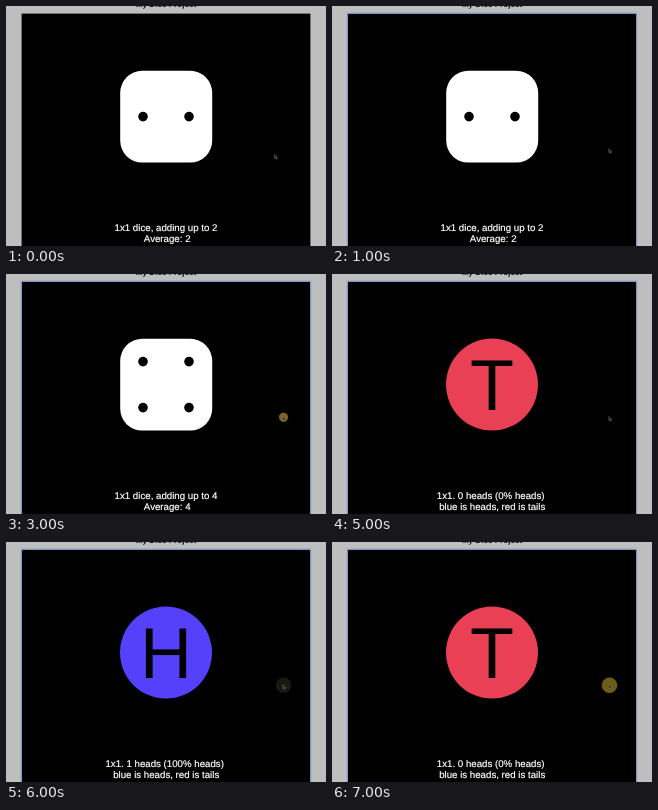
These frames come from a looping animation (320x240 px, 8000 ms). An HTML page:

```html
<!DOCTYPE html>
<html lang="en">
<head>
<meta charset="utf-8">
<title>My Dice Project</title>
<style>
  html, body { margin: 0; width: 100%; height: 100%; overflow: hidden; background: #bebebe; }
  svg { display: block; width: 320px; height: 240px; }
  text { font-family: "Liberation Sans", Arial, sans-serif; text-anchor: middle; text-rendering: geometricPrecision; }
  .line { font-size: 9.7px; fill: #fff; stroke: #fff; stroke-width: 0.2px; }
</style>
</head>
<body>
<svg viewBox="0 0 320 240">
  <rect width="320" height="240" fill="#bebebe"/>
  <text x="160" y="1.3" font-size="8.1" font-weight="bold" fill="#111">My Dice Project</text>
  <rect x="15.6" y="7.6" width="288.8" height="240"/>
  <rect id="focus" x="15.2" y="7.2" width="289.6" height="240" rx="0.6" fill="none" stroke="#8fa2d2" stroke-width="1.2"/>
  <g id="die">
    <rect x="114.2" y="64.8" width="92" height="91.8" rx="22" fill="#fff"/>
    <g id="pips"></g>
  </g>
  <g id="coin">
    <circle id="disc" cx="160" cy="110.6" r="46"/>
    <text id="face" x="160" y="135.7" font-size="72"></text>
  </g>
  <text id="top" class="line" y="224.7"></text>
  <text id="bottom" class="line" y="235.6"></text>
  <circle id="halo" cx="277.5" cy="143.2"/>
  <path id="cursor" d="M0 0V4L1 3.2L1.7 4.7L2.4 4.4L1.8 3H3Z" fill="#181818" stroke="#999" stroke-width="0.4"/>
</svg>
<script>
const $ = id => document.getElementById(id);
const STEP = 1000;

// Halo styles: radius, fill, stroke
const halos = {
  none: [0, "none", "none"],
  press: [4.2, "#7a6620", "#927a24"],
  full: [7.5, "#6c5d16", "#756518"],
  faint: [7.7, "#1a1810", "none"]
};

const steps = [
  { die: 2, halo: "none", idle: true },
  { die: 2, halo: "none" },
  { die: 5, halo: "full" },
  { die: 4, halo: "press" },
  { coin: "H", halo: "full" },
  { coin: "T", halo: "none" },
  { coin: "H", halo: "faint" },
  { coin: "T", halo: "full" }
];

// Pip places on a grid from -1 to 1
const corners = [[-1, -1], [1, -1], [-1, 1], [1, 1]];
const layouts = {
  2: [[-1, 0], [1, 0]],
  4: corners,
  5: [...corners, [0, 0]]
};

const show = (id, on) => $(id).setAttribute("visibility", on ? "visible" : "hidden");

function write(id, x, text) {
  $(id).setAttribute("x", x);
  $(id).textContent = text;
}

function drawDie(n) {
  $("pips").innerHTML = layouts[n].map(([x, y]) =>
    `<circle cx="${160 + 23 * x}" cy="${110.6 + 23 * y}" r="4.8"/>`).join("");
  write("top", 160, `1x1 dice, adding up to ${n}`);
  write("bottom", 161.2, `Average: ${n}`);
}

function drawCoin(side) {
  const heads = side === "H" ? 1 : 0;
  $("disc").setAttribute("fill", heads ? "#5540fb" : "#ea4056");
  $("face").textContent = side;
  write("top", 158.7, `1x1. ${heads} heads (${heads * 100}% heads)`);
  write("bottom", 160.2, "blue is heads, red is tails");
}

function draw(s) {
  show("die", s.die);
  show("coin", s.coin);
  show("focus", !s.idle);
  if (s.die) drawDie(s.die);
  else drawCoin(s.coin);
  const [r, fill, stroke] = halos[s.halo];
  const halo = $("halo");
  halo.setAttribute("r", r);
  halo.setAttribute("fill", fill);
  halo.setAttribute("stroke", stroke);
  halo.setAttribute("stroke-width", 0.6);
  const [x, y] = s.idle ? [268.6, 148.6] : [276.8, 142.6];
  $("cursor").setAttribute("transform", `translate(${x} ${y})`);
}

let current = -1;
const start = performance.now();

function tick() {
  const t = Math.max(0, performance.now() - start);
  const i = Math.floor(t / STEP) % steps.length;
  if (i !== current) draw(steps[current = i]);
  requestAnimationFrame(tick);
}
tick();
</script>
</body>
</html>
```
